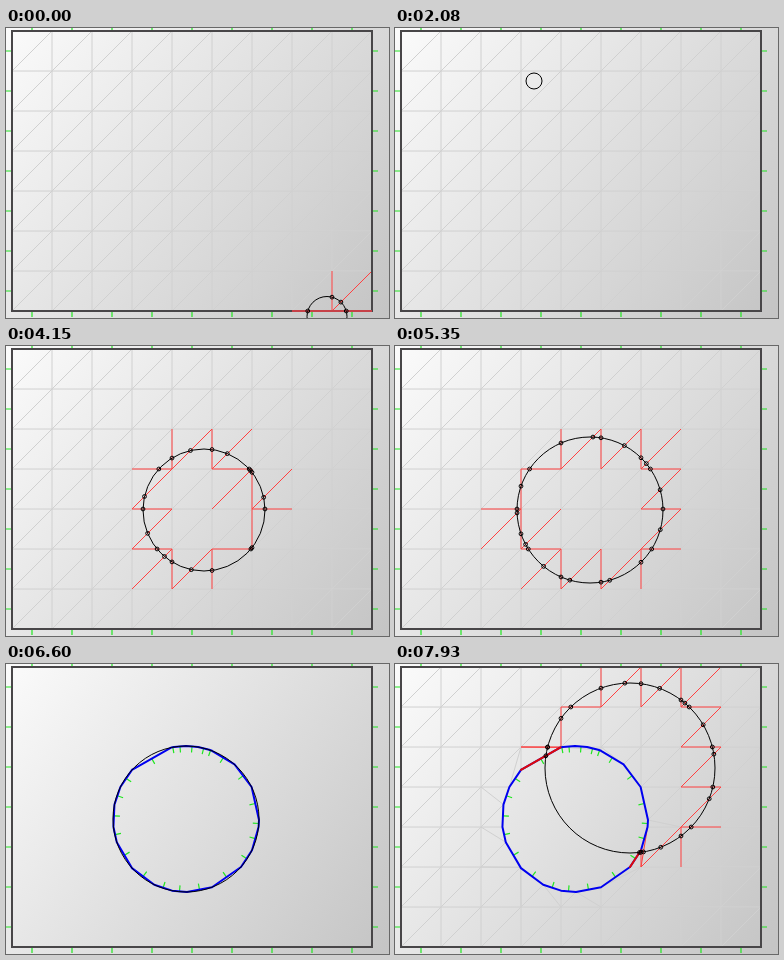
Recreate the animation shown at these times as an HTML page with a canvas. Size 383 by 290 pixels, loop 8 s.

```html
<!DOCTYPE html>
<html lang="en">
<head>
<meta charset="utf-8">
<title>Circle cutting a mesh</title>
<style>
html, body { margin: 0; width: 100%; height: 100%; overflow: hidden; background: #ddd; }
canvas { display: block; }
</style>
</head>
<body>
<canvas id="stage" width="383" height="290"></canvas>
<script>
const ctx = document.getElementById('stage').getContext('2d');
const LOOP = 8000, CUT = 6600, REMESH = 7160;
const X0 = 6, Y0 = 3, CELL = 40, COLS = 9, ROWS = 7;
const GRID = '#d0d0d0', HIT = '#ff4040', TICK = '#22e622';
const hole = { x: 180, y: 155, r: 73 };

// Moves: first step at start, last step at end, [start, end, steps, x, y, r]
const moves = [
  [0, 0, 1, 321, 288.5, 20],
  [430, 800, 6, 178, 16, 20],
  [874, 950, 2, 194, 14, 20],
  [1130, 1390, 5, 139, 53, 20],
  [2080, 2080, 1, 139, 53, 8],
  [2510, 3100, 10, 139, 53, 61],
  [3780, 4150, 7, 198, 164, 61],
  [4600, 4600, 1, 198, 164, 68],
  [4850, 4850, 1, 198, 164, 73],
  [5350, 5350, 1, 195, 164, 73],
  [5423, 5790, 6, 180, 155, 73],
  [7160, 7470, 6, 235, 104, 73],
  [7790, 7930, 3, 235, 104, 85]
];

function circleAt(t) {
  let c = { x: 0, y: 0, r: 0 };
  for (const [start, end, steps, x, y, r] of moves) {
    if (t < start) break;
    const k = t >= end ? 1 : (Math.floor((t - start) / (end - start) * (steps - 1) + 1e-6) + 1) / steps;
    c = { x: c.x + (x - c.x) * k, y: c.y + (y - c.y) * k, r: c.r + (r - c.r) * k };
  }
  return c;
}

const node = (i, j) => [X0 + i * CELL, Y0 + j * CELL];
const inside = (p, c) => Math.hypot(p[0] - c.x, p[1] - c.y) < c.r;

// Point where a segment with one end inside the circle leaves it
function crossing(a, b, c) {
  if (!inside(a, c)) [a, b] = [b, a];
  const dx = b[0] - a[0], dy = b[1] - a[1], fx = a[0] - c.x, fy = a[1] - c.y;
  const A = dx * dx + dy * dy, B = fx * dx + fy * dy, C = fx * fx + fy * fy - c.r * c.r;
  const k = (-B + Math.sqrt(B * B - A * C)) / A;
  return [a[0] + dx * k, a[1] + dy * k];
}

function buildGrid() {
  const inner = [], border = [];
  for (let j = 0; j <= ROWS; j++) for (let i = 0; i <= COLS; i++) {
    const p = node(i, j);
    if (i < COLS) (j % ROWS ? inner : border).push([p, node(i + 1, j)]);
    if (j < ROWS) (i % COLS ? inner : border).push([p, node(i, j + 1)]);
    if (i && j < ROWS) inner.push([p, node(i - 1, j + 1)]);
  }
  return { inner, border };
}

// Grid outside the hole, with the cut quads split along their shorter diagonal
function cutGrid(edges) {
  const out = [];
  for (const [a, b] of edges) {
    const ia = inside(a, hole), ib = inside(b, hole);
    if (ia && ib) continue;
    out.push(ia === ib ? [a, b] : [crossing(a, b, hole), ia ? b : a]);
  }
  const len = ([a, b]) => Math.hypot(a[0] - b[0], a[1] - b[1]);
  for (let j = 0; j < ROWS; j++) for (let i = 0; i < COLS; i++) {
    for (const corner of [node(i, j), node(i + 1, j + 1)]) {
      const tri = [corner, node(i + 1, j), node(i, j + 1)];
      const cut = tri.filter(p => inside(p, hole));
      if (cut.length !== 1) continue;
      const [a, b] = tri.filter(p => p !== cut[0]);
      const d1 = [crossing(cut[0], a, hole), b], d2 = [crossing(cut[0], b, hole), a];
      out.push(len(d1) < len(d2) ? d1 : d2);
    }
  }
  return out;
}

// Polygon through all points where the hole meets the grid lines
function buildHole() {
  const { x, y, r } = hole, pts = [[x, y - r]];
  const half = d => Math.sqrt(r * r - d * d);
  for (let i = 0; i <= COLS; i++) {
    const gx = X0 + i * CELL, d = gx - x;
    if (Math.abs(d) < r) pts.push([gx, y - half(d)], [gx, y + half(d)]);
  }
  for (let j = 0; j <= ROWS; j++) {
    const gy = Y0 + j * CELL, d = gy - y;
    if (Math.abs(d) < r) pts.push([x - half(d), gy], [x + half(d), gy]);
  }
  for (let k = 0; k <= COLS + ROWS; k++) {
    const d = (X0 + Y0 + k * CELL - x - y) / 2;
    if (Math.abs(d) * Math.SQRT2 >= r) continue;
    const h = half(d * Math.SQRT2) / Math.SQRT2;
    pts.push([x + d + h, y + d - h], [x + d - h, y + d + h]);
  }
  const angle = p => Math.atan2(p[1] - y, p[0] - x);
  pts.sort((a, b) => angle(a) - angle(b));
  const ring = pts.filter((p, i) => !i || Math.hypot(p[0] - pts[i - 1][0], p[1] - pts[i - 1][1]) > 1.6);
  return ring.map((p, i) => [p, ring[(i + 1) % ring.length]]);
}

const { inner, border } = buildGrid();
const remeshed = cutGrid(inner);
const ring = buildHole();

const back = ctx.createLinearGradient(0, 0, 383, 290);
back.addColorStop(0, '#fbfbfb');
back.addColorStop(1, '#c4c4c4');

function lines(edges, color, width) {
  ctx.beginPath();
  for (const [a, b] of edges) {
    ctx.moveTo(...a);
    ctx.lineTo(...b);
  }
  ctx.strokeStyle = color;
  ctx.lineWidth = width;
  ctx.stroke();
}

function dot(x, y, r) {
  ctx.beginPath();
  ctx.arc(x, y, r, 0, 2 * Math.PI);
  ctx.strokeStyle = '#000';
  ctx.lineWidth = 1;
  ctx.stroke();
}

// Short normals at edge midpoints; side is +1 away from the centre, -1 towards it
function normals(edges, cx, cy, side) {
  lines(edges.map(([a, b]) => {
    const mx = (a[0] + b[0]) / 2, my = (a[1] + b[1]) / 2;
    let nx = b[1] - a[1], ny = a[0] - b[0];
    const s = 6 * side * Math.sign(nx * (mx - cx) + ny * (my - cy)) / Math.hypot(nx, ny);
    return [[mx, my], [mx + nx * s, my + ny * s]];
  }), TICK, 1.2);
}

function draw(t) {
  const c = circleAt(t);
  const cut = t >= CUT, meshed = !cut || t >= REMESH;
  const hits = edges => meshed ? edges.filter(([a, b]) => inside(a, c) !== inside(b, c)) : [];
  const grid = cut ? remeshed : inner;
  const gridHits = hits(grid), borderHits = hits(border), ringHits = cut ? hits(ring) : [];

  ctx.fillStyle = back;
  ctx.fillRect(0, 0, 383, 290);
  if (meshed) lines(grid, GRID, 1);
  lines(gridHits, HIT, 1);
  normals(border, 186, 143, 1);
  ctx.strokeStyle = '#484648';
  ctx.lineWidth = 2;
  ctx.strokeRect(X0, Y0, COLS * CELL, ROWS * CELL);
  lines(borderHits, '#f04048', 1.5);
  if (cut) {
    normals(ring, hole.x, hole.y, -1);
    ctx.lineCap = 'round';
    lines(ring, '#0000f0', 2);
    lines(ringHits, '#e00808', 2);
    ctx.lineCap = 'butt';
  }
  dot(c.x, c.y, c.r);
  for (const [a, b] of [...gridHits, ...borderHits, ...ringHits]) dot(...crossing(a, b, c), 1.9);
}

function tick(now) {
  draw(now % LOOP);
  requestAnimationFrame(tick);
}
draw(0);
requestAnimationFrame(tick);
</script>
</body>
</html>
```
